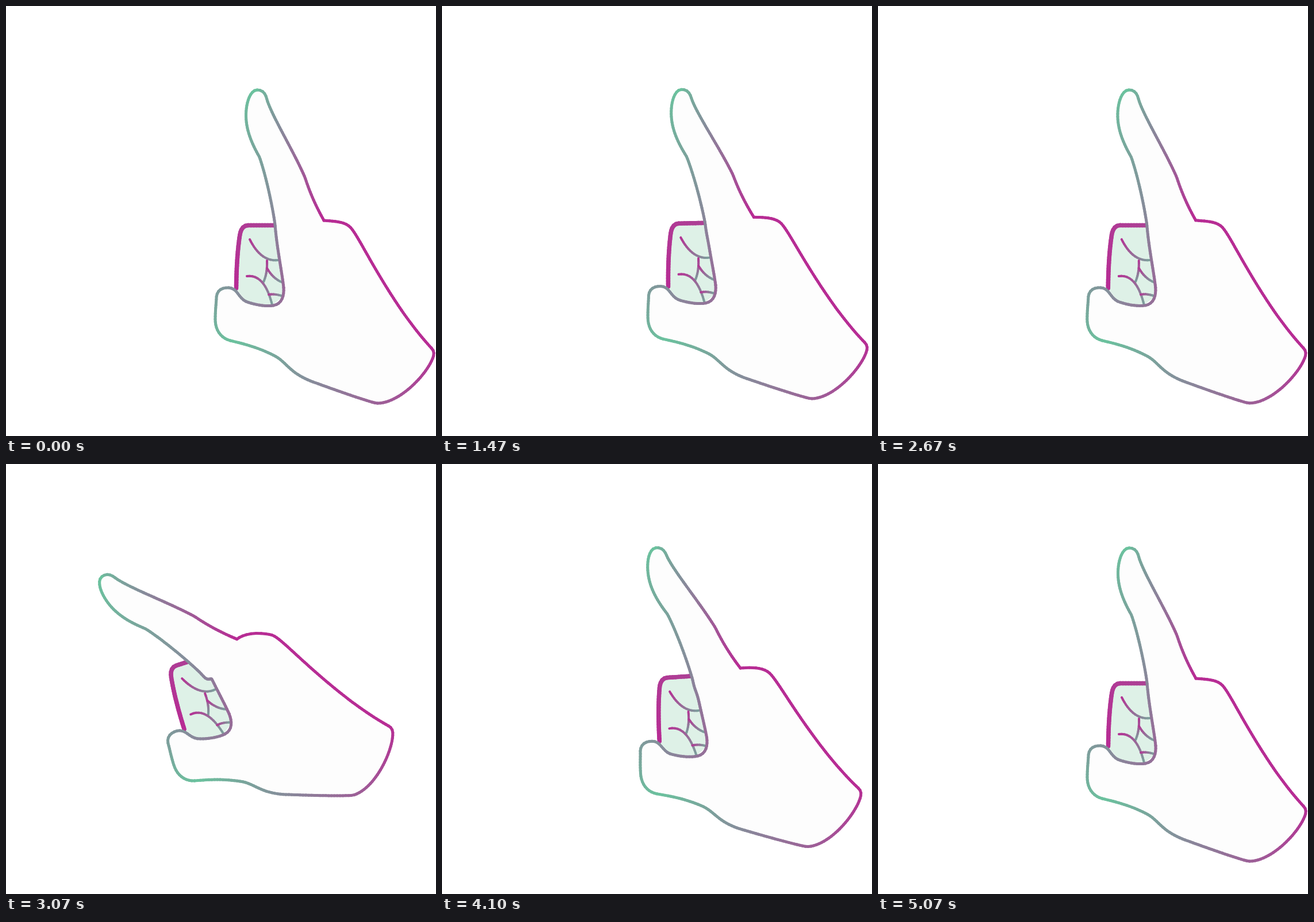
Animation of 748 by 748 pixels, one loop 5110 ms. Source, as an HTML page with a canvas:

```html
<!DOCTYPE html>
<html>
<head>
<meta charset="utf-8">
<style>
html, body { margin: 0; width: 100%; height: 100%; overflow: hidden; background: #fff; }
canvas { display: block; }
svg { position: absolute; }
</style>
</head>
<body>
<canvas id="stage" width="748" height="748"></canvas>
<svg width="0" height="0"><path id="guide"/></svg>
<script>
const ctx = document.getElementById('stage').getContext('2d');
const guide = document.getElementById('guide');
const LOOP = 5110, STEPS = 16, PRESS = 7, MAX_BEND = 24;
const pivot = [260, 769], knuckle = [553, 373];

const clamp = v => Math.max(0, Math.min(1, v));
const mix = (a, b, t) => a + (b - a) * t;
// 0 is green, 1 is magenta
const tone = t => `rgb(${mix(107, 183, t)},${mix(194, 44, t)},${mix(158, 148, t)})`;

// Samples a curve as points whose tone runs evenly from t0 to t1
function curve(t0, t1, d) {
  guide.setAttribute('d', d);
  const len = guide.getTotalLength(), n = Math.ceil(len / 5);
  return Array.from({ length: n + 1 }, (_, i) => {
    const p = guide.getPointAtLength(len * i / n);
    return [p.x, p.y, mix(t0, t1, i / n)];
  });
}

const outline = [
  // finger, outer side
  curve(.05, 1, 'M437 146C448 146 452 154 454 163C463 192 500 252 520 298C529 326 540 350 553 373'),
  // back of the hand
  curve(1, 1, 'M553 373C575 375 590 375 600 386C614 402 640 460 692 535C707 556 724 578 740 595'),
  // wrist and lower edge
  curve(1, 0, 'M740 595C748 603 743 612 738 622C720 654 678 692 645 691C632 689 570 667 540 656C495 641 490 622 470 610C440 594 415 588 390 582'),
  // thumb
  curve(0, .6, 'M390 582C372 577 364 562 364 545C364 528 366 514 366 507C367 494 376 490 386 490C404 490 403 509 420 515C435 520 448 522 460 521.5C478 521 484 508 483 490'),
  // finger, inner side
  curve(.6, 0, 'M483 490C480 462 471 420 468 380C463 345 452 295 441 263C425 235 417 212 417.5 188C418 165 426 146 437 146')
].flat();

const fistEdge = curve(.85, 1, 'M470 381.5H421Q410 382 407 397Q401 435 400.5 491');
const fistBase = curve(0, 0, 'M400 491L418 514L462 521L484 504L478 440');
const creases = [
  'M424 406Q444 446 474 442', 'M454 443Q455 466 447 482', 'M454 456Q464 474 481 481',
  'M419 470Q450 466 463 520', 'M457 502Q468 500 482 505'
].map(d => curve(1, .25, d));

function turn(x, y, deg) {
  const a = deg * Math.PI / 180, c = Math.cos(a), s = Math.sin(a);
  return [x * c + y * s, y * c - x * s];
}

function palm([x, y, t], bend) {
  const [dx, dy] = turn(x - pivot[0], y - pivot[1], bend);
  return [pivot[0] + dx - 5 * Math.sin(bend / 5), pivot[1] + dy, t];
}

// The index finger turns about the knuckle on top of the palm's own rotation
function finger([x, y], bend) {
  const [kx, ky] = palm(knuckle, bend);
  const [dx, dy] = turn(x - knuckle[0], y - knuckle[1], 2.12 * bend);
  const stretch = 1 + bend / 1200;
  return [kx - .95 * bend + dx * stretch, ky + .15 * bend + dy * stretch];
}

// Blends from palm to finger around the knuckle
function hand(point, bend) {
  const [x, y, t] = point;
  const k = clamp((430 - y - Math.max(0, x - 540)) / 40), w = k * k * (3 - 2 * k);
  const p = palm(point, bend), f = finger(point, bend);
  return [mix(p[0], f[0], w), mix(p[1], f[1], w), t];
}

function fill(pts, color) {
  ctx.beginPath();
  pts.forEach(([x, y]) => ctx.lineTo(x, y));
  ctx.fillStyle = color;
  ctx.fill();
}

function stroke(pts, width) {
  ctx.lineWidth = width;
  for (let i = 1; i < pts.length; i++) {
    ctx.strokeStyle = tone(pts[i][2]);
    ctx.beginPath();
    ctx.moveTo(pts[i - 1][0], pts[i - 1][1]);
    ctx.lineTo(pts[i][0], pts[i][1]);
    ctx.stroke();
  }
}

function drawBurst(step) {
  const left = 12 - step;
  if (step <= PRESS || left <= 0) return;
  const inner = 160 - 8.5 * left ** 1.67, outer = 160 - .4 * left ** 3;
  ctx.save();
  ctx.translate(169.5, 222.5);
  ctx.strokeStyle = '#00aaff';
  ctx.lineWidth = 15.5;
  ctx.beginPath();
  for (let i = 0; i < 8; i++) {
    ctx.moveTo(inner, -2.5);
    ctx.lineTo(outer, -2.5);
    ctx.rotate(Math.PI / 4);
  }
  ctx.stroke();
  ctx.restore();
}

function drawHand(bend) {
  const folded = pts => pts.map(p => palm(p, bend));
  fill(folded([...fistEdge, ...fistBase]), '#def1e7');
  creases.forEach(c => stroke(folded(c), 4));
  stroke(folded(fistEdge), 7.5);

  const pts = outline.map(p => hand(p, bend));
  fill(pts, '#fdfdfd');
  stroke(pts, 5);
}

// Accelerates into the press, then eases back to rest
function bendAt(step) {
  const x = clamp((step - .8) / (PRESS - .8));
  const share = step <= PRESS ? x * x * (1.4 - .4 * x) : ((15 - step) / 8) ** 1.6;
  return MAX_BEND * share;
}

// Steps run at 12.5 per second, shown on a 30 per second grid
function stepAt(ms) {
  const tick = Math.floor((ms % LOOP + 3.4) * .03);
  return Math.floor(tick * 5 / 12) % STEPS;
}

let start;
function frame(now) {
  start ??= now;
  const step = stepAt(now - start);
  ctx.fillStyle = '#fff';
  ctx.fillRect(0, 0, 748, 748);
  ctx.lineCap = ctx.lineJoin = 'round';
  drawBurst(step);
  drawHand(bendAt(step));
  requestAnimationFrame(frame);
}
requestAnimationFrame(frame);
</script>
</body>
</html>
```
